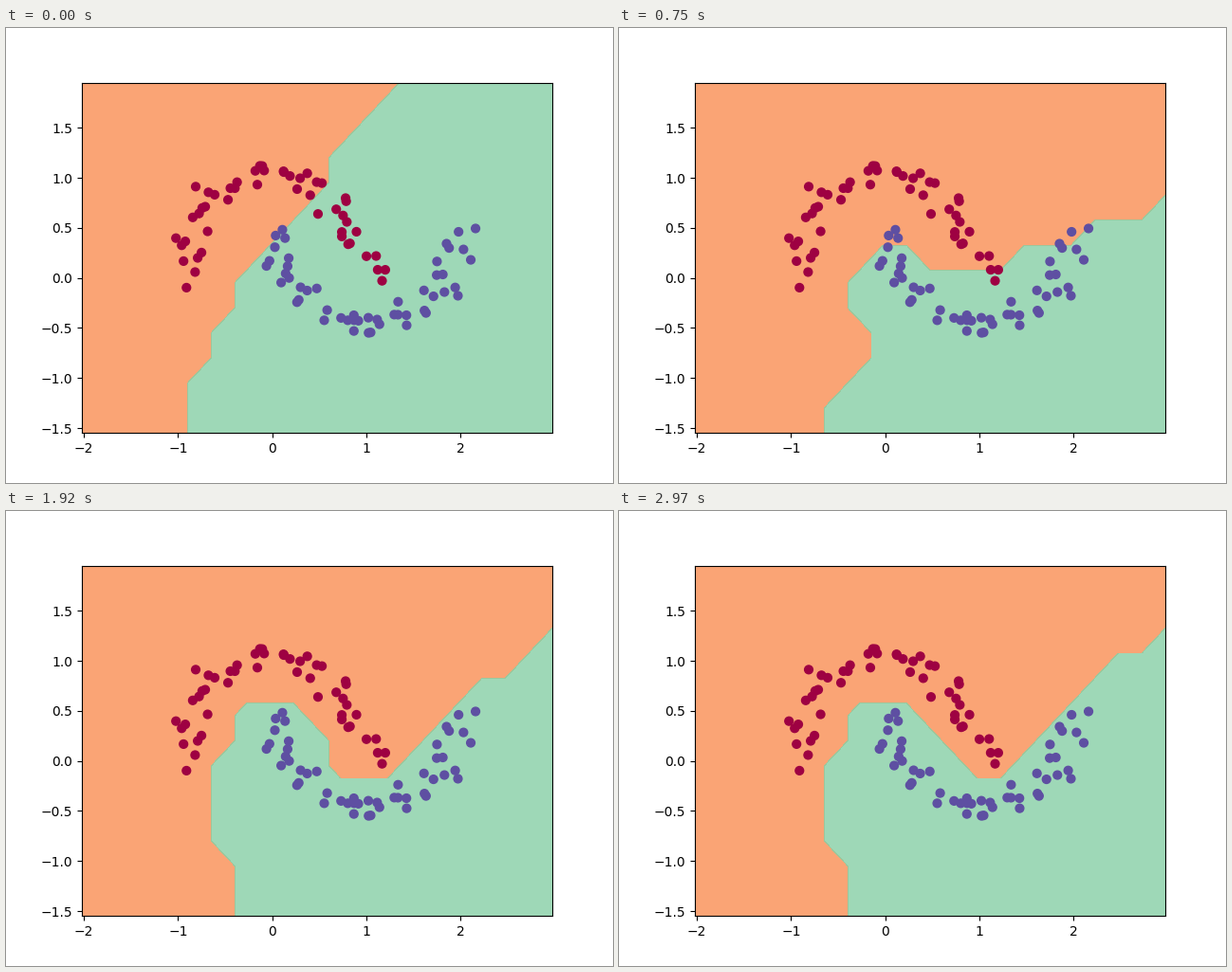
Write a matplotlib script that moves like this. It is 640 by 480 pixels and loops after 3 s.

```python
import random

import matplotlib.pyplot as plt
import numpy as np
from matplotlib.animation import FuncAnimation

SEED, STEPS, CELL, DECAY = 1337, 100, 0.25, 1e-4


def make_moons(n=100, noise=0.1):
    """Two interleaved noisy half circles, labelled -1 and 1."""
    rng = np.random.RandomState(SEED)
    t = np.linspace(0, np.pi, n // 2)
    upper = np.column_stack([np.cos(t), np.sin(t)])
    lower = np.column_stack([1 - np.cos(t), 0.5 - np.sin(t)])
    order = np.arange(n)
    rng.shuffle(order)
    pts = np.vstack([upper, lower])[order] + rng.normal(scale=noise, size=(n, 2))
    return pts, np.repeat([-1, 1], n // 2)[order]


def make_net(*sizes):
    rnd = random.Random(SEED)
    return [(np.array([[rnd.uniform(-1, 1) for _ in range(n_in)] for _ in range(n_out)]),
             np.zeros(n_out)) for n_in, n_out in zip(sizes, sizes[1:])]


def forward(x, net):
    """Activations of every layer; ReLU on all but the last."""
    acts = [x]
    for i, (w, b) in enumerate(net):
        x = x @ w.T + b
        if i < len(net) - 1:
            x = np.maximum(x, 0)
        acts.append(x)
    return acts


def descend(net, pts, labels, rate):
    """One full-batch step on the max-margin loss with weight decay."""
    acts = forward(pts, net)
    y = labels[:, None]
    delta = np.where(y * acts[-1] < 1, -y, 0) / len(pts)
    updated = []
    for (w, b), act in zip(net[::-1], acts[-2::-1]):
        grad_w = delta.T @ act + 2 * DECAY * w
        grad_b = delta.sum(0) + 2 * DECAY * b
        updated.append((w - rate * grad_w, b - rate * grad_b))
        delta = (delta @ w) * (act > 0)
    return updated[::-1]


pts, labels = make_moons()
lo, hi = pts.min(0) - 1, pts.max(0) + 1
xx, yy = np.meshgrid(*(np.arange(a, b, CELL) for a, b in zip(lo, hi)))
grid = np.column_stack([xx.ravel(), yy.ravel()])

net = make_net(2, 16, 16, 1)
masks = []
for step in range(STEPS):
    net = descend(net, pts, labels, 1 - 0.9 * step / STEPS)
    masks.append(forward(grid, net)[-1].reshape(xx.shape) > 0)

fig, ax = plt.subplots(figsize=(6.4, 4.8), dpi=100)
ax.scatter(*pts.T, c=labels, s=40, cmap="Spectral", zorder=1.5)
ax.set(xlim=(xx.min(), xx.max()), ylim=(yy.min(), yy.max()))
regions = None


def draw(k):
    global regions
    if regions is not None:
        regions.remove()
    regions = ax.contourf(xx, yy, masks[k].astype(float), levels=[0, 0.5, 1],
                          cmap="Spectral", alpha=0.8, zorder=1)
    return [regions]


anim = FuncAnimation(fig, draw, frames=STEPS, interval=30, repeat=True, repeat_delay=0)
plt.show()
```
